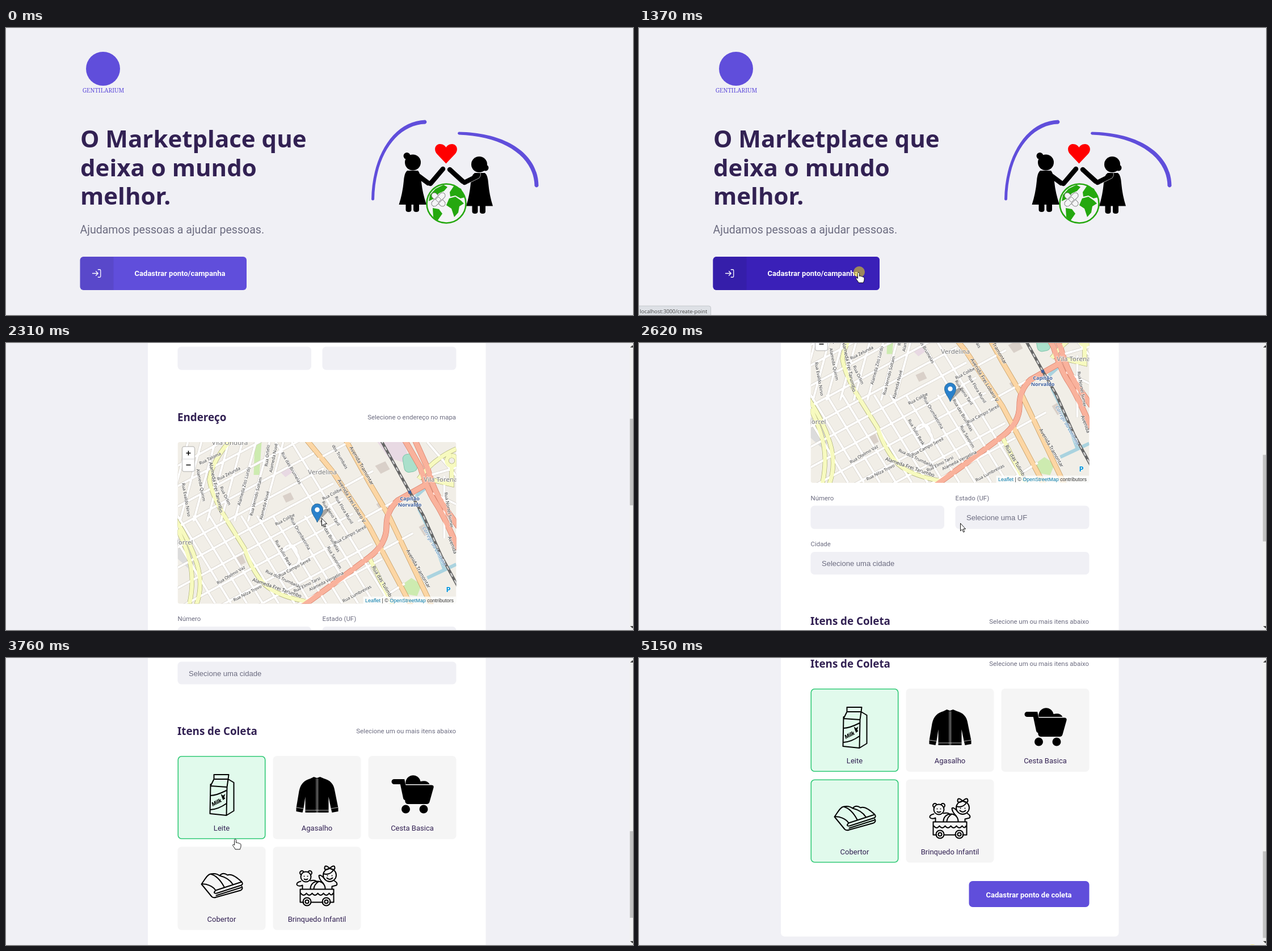
An HTML page for the animation above (5.23 s loop, 1105x507 px).

```html
<!DOCTYPE html>
<html lang="pt-BR">
<head>
<meta charset="utf-8">
<title>Ponto de coleta</title>
<style>
html, body { margin: 0; width: 100%; height: 100%; overflow: hidden; background: #f0f0f5; }
svg { display: block; width: 100%; height: 100%; font-family: Roboto, sans-serif; }
text { white-space: pre; }
.title { font: 700 42px "Noto Sans", "Open Sans", sans-serif; fill: #322153; }
.h1 { font-size: 28px; }
.h2 { font-size: 18.8px; }
.lead { font-size: 19.56px; fill: #6c6c80; }
.btn { font-size: 13.04px; font-weight: 700; fill: #fff; }
.label { font-size: 11.41px; fill: #6c6c80; }
.pick { font: 13.04px "Liberation Sans", Arial, sans-serif; fill: #6c6c80; }
.item { font-size: 13.04px; fill: #322153; text-anchor: middle; }
.end { text-anchor: end; }
.mid { text-anchor: middle; }
.line { fill: none; stroke: #000; stroke-width: 2; stroke-linejoin: round; stroke-linecap: round; }
#map text { font-family: "Noto Sans", sans-serif; font-size: 7.6px; fill: #333; text-anchor: middle;
  paint-order: stroke; stroke: #fff; stroke-width: 1.4px; stroke-opacity: .8; }
#map .big { font-size: 8.6px; }
#map .place { font-size: 11.5px; fill: #777; }
#map .stop { font-size: 9px; font-weight: 700; fill: #3d5f9e; }
#map .water { font-style: italic; fill: #4d80b3; font-size: 8.6px; }
#map .credit { font: 8.97px "Liberation Sans", Arial, sans-serif; text-anchor: end; stroke: none; }
</style>
</head>
<body>
<svg viewBox="0 0 1105 507">
  <rect width="1105" height="507" fill="#f0f0f5"/>
  <defs>
    <g id="logo">
      <circle cx="171" cy="72" r="30" fill="#604edb"/>
      <text x="171.5" y="114" class="mid" style="font:10.4px 'Noto Serif',serif;fill:#604edb">GENTILARIUM</text>
    </g>
  </defs>

  <g id="home">
    <use href="#logo"/>
    <g class="title">
      <text x="131" y="211">O Marketplace que</text>
      <text x="131" y="261.6">deixa o mundo</text>
      <text x="131" y="312.2">melhor.</text>
    </g>
    <text class="lead" x="130.5" y="362.5">Ajudamos pessoas a ajudar pessoas.</text>
    <rect x="130.5" y="404" width="293.5" height="59" rx="6" fill="#604edb"/>
    <rect id="hover" x="130.5" y="404" width="293.5" height="59" rx="6" fill="#3a20b8"/>
    <path d="M189.5 404H136.5a6 6 0 0 0-6 6v47a6 6 0 0 0 6 6h53z" fill-opacity=".08"/>
    <path transform="translate(151 424.5) scale(.75)" fill="none" stroke="#fff" stroke-width="1.7" stroke-linecap="round" stroke-linejoin="round"
      d="M15 3h4a2 2 0 0 1 2 2v14a2 2 0 0 1-2 2h-4M10 17l5-5-5-5M15 12H2"/>
    <text class="btn mid" x="306.5" y="438">Cadastrar ponto/campanha</text>

    <g fill="#604edb">
      <path d="M644 303C645 225 684 164 739 162.500q5 3.500 0 7C687 171 650 228 649 303q-2.500 3-5 0z"/>
      <path d="M798 183.500C882 185 938 222 938.500 279q-3.500 5-7 0C931 228 878 191 798 188.500q-4-2.500 0-5z"/>
    </g>
    <path fill="#f00" d="M775.5 239.5L759 222C753 214 757 205 765 205C770 205 774 208 775.5 211C777 208 781 205 786 205C794 205 798 214 792 222Z"/>
    <circle cx="717" cy="237.5" r="14"/><circle cx="706.5" cy="226" r="6"/>
    <path d="M707 252H726Q731 258 732 272Q734 292 741 312H692.5Q699 292 701 270Q702 256 707 252ZM704.5 311h10v10q0 4-5 4t-5-4zM718 311h10v10q0 4-5 4t-5-4z"/>
    <circle cx="834" cy="241" r="14"/><circle cx="845" cy="247" r="5.5"/>
    <path d="M826 256H844Q849 260 850 274Q852 296 858 314.500H811Q817 296 819 274Q820 260 826 256ZM821.5 314h10v10q0 4-5 4t-5-4zM835 314h10v10q0 4-5 4t-5-4z"/>
    <g class="line" style="stroke-width:8.5">
      <path d="M728 262L744 274M748 275L770 249"/>
      <path d="M828 263L808 273M805 271L782 250"/>
    </g>
    <path d="M812 276L834 265Q838 260 836 256" fill="none" stroke="#ccc" stroke-width=".8"/>
    <circle cx="776" cy="310" r="34.5" fill="#f4f4f6" stroke="#25a80f" stroke-width="2.6"/>
    <path fill="#25a80f" d="M757 284l14-7 7 4-6 7-9 4-10 10-8 4 2-11zM752 318l11 2 6 8-9 13-7-7zM782 290l8-12 12 6 7 15-8 2-9-5-9 2zM781 301l11-3 10 7 5 5-8 5-2 11-7 8-5-15-9-6z"/>
    <g fill="#f4f4f6" stroke="#666" stroke-dasharray="2 .7">
      <rect x="747" y="298" width="30" height="10" rx="5" transform="rotate(45 762 303)"/>
      <rect x="747" y="298" width="30" height="10" rx="5" transform="rotate(-45 762 303)"/>
      <path d="M757 303l5-5 5 5-5 5z"/>
    </g>
  </g>

  <g id="form">
    <g id="page"></g>
    <rect x="1099" width="6" height="507" fill="#f1f1f1"/>
    <rect id="thumb" x="1099.5" width="6" height="153" fill="#c1c1c1"/>
    <path d="M1100 8l4-4 4 4zM1100 500l4 4 4-4z" fill="#444"/>
  </g>

  <g id="status">
    <path d="M-1 491H123q3.5 0 3.5 3.5V508H-1z" fill="#dee1e6" stroke="#c4c7cc"/>
    <text x="1.5" y="503.5" style="font:9.3px 'Open Sans',sans-serif;fill:#444">localhost:3000/create-point</text>
  </g>
  <g id="pointer">
    <circle id="click" r="10" cx="1" cy="-1" fill="#fff000" fill-opacity=".5"/>
    <path id="arrow" fill="#fff" stroke="#000" stroke-width=".9" d="M.5.5V14L3.6 11.2L5.7 16.2L7.7 15.3L5.6 10.5H9.5Z"/>
    <path id="hand" fill="#fff" stroke="#000" stroke-width=".9" d="M-1.5 1.5C-1.5-.6 1.5-.6 1.5 1.5V6.5C3 5.7 4.5 6 4.6 7C6 6.5 7.3 7 7.4 8C8.8 7.6 10 8.4 10 9.6V12.5C10 15 8.5 16 8.5 18H0C-.5 15.5-4 13-4.5 10.5C-4.2 9-2.5 9.3-1.5 10.5Z"/>
  </g>
</svg>
<script>
const $ = id => document.getElementById(id);
const text = (x, y, s, cls) => `<text x="${x}" y="${y}" class="${cls}">${s}</text>`;
const box = (x, y, w, h, fill) => `<rect x="${x}" y="${y}" width="${w}" height="${h}" rx="6.5" fill="${fill}"/>`;
const line = (d, extra = '') => `<path class="line" d="${d}" ${extra}/>`;
const dot = (x, y, r, extra = '') => `<circle class="line" cx="${x}" cy="${y}" r="${r}" ${extra}/>`;

// --- street map, 491 x 285.5 ---
function streets() {
  let d = '';
  for (let x = -107; x < 220; x += 28) {
    const v = x < 160 ? 130 : 0;
    d += `M${x + v * .607} ${v}L${x + 173} 285`;
  }
  for (let x = -20; x < 150; x += 24) d += `M${x} 140L${x + 38} 0`;
  for (let c = 42; c < 430; c += 36) {
    const x = (228 + .64 * c) / 1.3475;
    d += `M0 ${c}L${x} ${c - .543 * x}`;
  }
  for (let v = 30; v < 220; v += 55) d += `M${228 + .64 * v} ${v}l62-34`;
  return d + 'M190 205a12 13 0 1 0 20-8a12 13 0 1 0-20 8M440 0L491 60M440 60L491 45M450 90L491 110M470 60V170M345 285L400 250';
}

const roads = [
  ['#fff', '#cfcac2', 4, streets()],
  ['#f7fabf', '#a3a56a', 7, 'M95-5Q62 30 56 66Q60 95 88 140L118 188Q130 225 150 248T228 282M-5 135Q22 175 34 215T32 290M0 155Q20 195 24 225T20 290M338 205L380 290M425 65Q450 30 491 12M483 24a9 9 0 1 0 .1 0M483 42V75L440 65'],
  ['#fcd6a4', '#b98d4f', 8, 'M228-3L273 52L338 150L412 290M296-4L338 72L372 130L448 290'],
  ['#f9b29c', '#d1705a', 9, 'M220 290L278 248L338 203Q368 180 368 150T388 103L436 76M400-4L428 45Q440 85 455 108T495 190M418-4L440 45Q452 90 474 120L495 150'],
];

const bigNames = [
  ['Alameda Frei Tarumbo', 67, 80, 78], ['Alameda Frei Tarumbo', 175, 258, 19],
  ['Avenida Tramontar', 324, 42, 60], ['Avenida Tramontar', 424, 224, 60],
  ['Avenida Frei Lobaro V', 306, 104, 59], ['Rua das Tulimbas', 362, 250, 60],
  ['Avenida', 484, 182, 70],
];
const names = [
  ['Rua Taloma', 57, 29, -26], ['Rua Zelunda', 90, 56, -27], ['Rua Colibe', 272, 92, -28],
  ['Rua Colibe', 189, 137, -28], ['Rua das Brumelas', 200, 46, 60], ['Rua das Brumelas', 268, 166, 60],
  ['Rua Nilza Trovo', 123, 267, -27], ['Rua Otelmo Vaz', 94, 235, -31], ['Rua Campo Sereil', 304, 164, -28],
  ['Rua Campo Sereil', 206, 222, -28], ['Alameda Vergelina', 262, 246, -27], ['Rua Elmo Tarsi', 228, 252, -27],
  ['Alameda Quirim', 41, 76, 79], ['Alameda Zito Lurdo', 117, 78, -75], ['Rua Vernido Soltam', 138, 96, -76],
  ['Rua Ortelo', 158, 24, -85], ['Alameda Nuvé', 169, 28, -79], ['Alameda Nuvé', 153, 112, -76],
  ['dos Trumbais', 286, 26, 60], ['Rua Beno Taril', 270, 126, 56], ['Rua Flora Munil', 293, 120, 59],
  ['Rua Orumbetinha', 216, 162, 60], ['Rua Tulio Besk', 186, 196, 60], ['Rua Savorim', 276, 204, 60],
  ['Rua dos Trumbelás', 186, 242, 25], ['Rua Evaldo Nirso', 15, 102, 80], ['Rua Orlim', 84, 95, 65],
  ['Rua Nortel Sumer', 478, 120, 80], ['Rua Lumbreiras', 316, 268, -28],
];
const label = (cls, dy = 2.5) => ([s, x, y, a]) =>
  `<text class="${cls}" transform="translate(${x} ${y}) rotate(${a})" y="${dy}">${s}</text>`;

function map() {
  const casing = roads.map(([, c, w, d]) => `<path d="${d}" stroke="${c}" stroke-width="${w + 1.2}"/>`);
  const fill = roads.map(([c, , w, d]) => `<path d="${d}" stroke="${c}" stroke-width="${w}"/>`);
  const rail = 'M358-4L409 88L433 130L465 202L494 255';
  return `<clipPath id="clip"><rect width="491" height="285.5" rx="4"/></clipPath>
  <g id="map" transform="translate(302.5 582)" clip-path="url(#clip)">
    <rect width="491" height="286" fill="#f1eee7"/>
    <path fill="#e8d9e3" d="M352 0h46l14 40-40-12zM180 52l14-10 10 10-14 10z"/>
    <path fill="#dcdcdc" d="M0 170l22 8 12 28-10 22-24-22z"/>
    <path fill="#cdebb0" d="M136 0h12l-4 58h-10zM398 250l14-10 18 12-8 20-22-4z"/>
    <path fill="#d9d0c9" d="M348 42l18-8 8 14-16 8zM185 95l14-6 6 12-14 6zM100 205l14-6 6 14-12 6zM350 110l10-8 6 10-10 6zM425 150l10-6 8 18-8 4z"/>
    <rect x="398" y="21" width="23" height="32" rx="8" fill="#aae0cb" stroke="#7fc5ab" transform="rotate(-10 409 37)"/>
    <path d="M425 118L448 165L470 225M440 240L491 216M420 96L440 78" fill="none" stroke="#aad3df" stroke-width="6"/>
    <g fill="none">${casing.join('')}${fill.join('')}
      <path d="${rail}" stroke="#666" stroke-width="5"/>
      <path d="${rail}" stroke="#ddd" stroke-width="2" stroke-dasharray="7 7"/></g>
    ${names.map(label('')).join('')}${bigNames.map(label('big')).join('')}
    ${label('water')(['Córrego da Lontrina', 452, 184, 61])}
    ${text(92, 5, 'Vila Ondura', 'place')}${text(255, 57, 'Verdelina', 'place')}
    ${text(467, 70, 'Vila Torenau', 'place')}${text(9, 181, 'Morrel', 'place')}
    ${text(409, 103, 'Capitão', 'stop')}${text(409, 114, 'Norvaldo', 'stop')}
    <rect x="406.5" y="86" width="5" height="5" fill="#3d5f9e"/>
    <text x="477" y="265" style="font-size:13px;font-weight:700;fill:#0092da">P</text>
    <path d="M246 142l15-15q7-6 3-9t-10 7z" fill-opacity=".3"/>
    <g transform="translate(246 142)"><path d="M0 0C-3-9-10-14-10-23a10 10 0 0 1 20 0C10-14 3-9 0 0Z" fill="#2a81cb" stroke="#2e6c97"/><circle cy="-22.5" r="4.2" fill="#fff"/></g>
    <rect x="8" y="8" width="22" height="44" rx="3.5" fill="#fff" stroke="#000" stroke-opacity=".2" stroke-width="1.6"/>
    <path d="M9 30H29" stroke="#ccc" stroke-width=".8"/>
    <path d="M15 19.5h8M19 15.5v8M15 40.5h8" stroke="#000" stroke-width="1.7"/>
    <rect x="327" y="273" width="164" height="13" fill="#fff" fill-opacity=".75"/>
    <text class="credit" x="486.5" y="282.5"><tspan fill="#0078a8">Leaflet</tspan> | © <tspan fill="#0078a8">OpenStreetMap</tspan> contributors</text>
  </g>`;
}

// --- collection items, 155 x 147 each ---
const items = [
  ['Leite', 0, 0, line('M58 50L57 102L86 105L87 55L58 53L64 41H89L87 55M64 41V33H90L89 41L99 47V97L86 105M58 70Q68 70 86 61M58 95Q72 94 86 84', 'stroke-width="2.6"') +
    '<text transform="translate(62 89) rotate(-27)" style="font-size:9.5px;font-weight:900;font-style:italic">Milk</text><path d="M76 67l4 3 4-3-2 6 2 2-4 3-2-5z"/>'],
  ['Agasalho', 1, 0, '<path d="M66 40L72 37L77.5 39L83 37L90 40C100 43 107 48 109 62L115 92V98L104 100L102 92L98 72V100H57V72L54 92L52 100L41 98V92L46 62C49 48 56 43 66 40Z"/><path d="M76.5 40V100M79 40V100M41 91l13 2M115 91l-13 2M57 96h41" stroke="#ddd" stroke-width=".8" fill="none"/>'],
  ['Cesta Basica', 2, 0, '<path d="M45.5 45.5H60L66 74" fill="none" stroke="#000" stroke-width="9" stroke-linecap="round"/><path d="M66 50A13 13 0 0 1 92 45Q104 42 108 50ZM62 51.5H111Q116 51.5 115 56L108 81Q107 85 103 85H70Q66 85 65 81Z"/><circle cx="66" cy="94" r="7.5"/><circle cx="97.5" cy="94" r="7.5"/>'],
  ['Cobertor', 0, 1, line('M42 66C48 58 52 49 58 48Q68 46 74 51Q80 44 88 50Q96 46 113 62L67 77C62 69 50 65 42 66ZM42 66L60 88Q63 91 68 89L111 77Q116 74 113 70M113 62Q116 66 112 68L69 82Q61 83 67 77M68 86L112 72M58 48Q72 52 82 71M74 51Q90 55 97 66', 'stroke-width="2.3"')],
  ['Brinquedo Infantil', 1, 1, line('M48 75H107V98H100M88 98H67M54 98H48V75M49 82q5 7 10 0q5 7 10 0q5 7 10 0q5 7 10 0q5 7 10 0q4 6 7 0') +
    dot(60, 97, 7) + dot(60, 97, 3) + dot(94, 97, 7) + dot(94, 97, 3) + line('M66 74A12 12 0 0 1 92 74M72 74Q73 66 80 62M49 61q-8 2-7 6q3 4 10 1v6M66 60q9-2 11 2M92 58q-8-10-11-7q0 6 8 14M108 60q7 4 4 8l-8 2v4') +
    dot(51, 46, 3.5) + dot(65, 46, 3.5) + dot(58, 53, 9, 'style="fill:#f5f5f5"') + dot(100, 50, 11.5) +
    line('M55 52v.1M61 52v.1M55 57q3 2 6 0M90 48Q100 50 106 42M96 51v.1M104 51v.1M95 55q5 5 10 0M100 38q-9-8-9 0q1 5 9 0q9-8 9 0q-1 5-9 0')],
];
const card = ([name, col, row, art], i) =>
  `<g transform="translate(${302.5 + 168 * col} ${1156 + 160.5 * row})">${box(0, 0, 155, 147, '#f5f5f5')}
    <rect id="on${i}" x=".8" y=".8" width="153.4" height="145.4" rx="6" fill="#e1faec" stroke="#34cb79" stroke-width="1.63"/>
    ${art}${text(77.5, 132, name, 'item')}</g>`;

const heading = (y, s, note = '') => text(302, y + 6.8, s, 'title h2') + text(793, y + 4, note, 'label end');
const field = (x, y, w, s, pick = '', h = 41) =>
  text(x, y - 10, s, 'label') + box(x, y, w, h, '#f0f0f5') + text(x + 19.5, y + 25, pick, 'pick');

$('page').innerHTML = '<use href="#logo" x="-27" y="-12"/>' +
  '<path d="M881 50h11M881 50l4-4M881 50l4 4" stroke="#604edb" stroke-width="1.5"/>' +
  '<text x="1000" y="54.5" class="btn end" style="fill:#322153">Voltar para home</text>' +
  box(250, 118, 595.5, 1476, '#fff') + text(302, 196, 'Cadastro do ponto de coleta', 'title h1') +
  heading(266, 'Dados') + field(302.5, 332, 491, 'Nome da entidade') +
  field(302.5, 413.5, 235.5, 'E-mail') + field(557.5, 413.5, 236, 'FalaJato') +
  heading(538, 'Endereço', 'Selecione o endereço no mapa') + map() +
  field(302.5, 908, 235.5, 'Número') + field(557.5, 908, 236, 'Estado (UF)', 'Selecione uma UF') +
  field(302.5, 989.5, 491, 'Cidade', 'Selecione uma cidade', 40) +
  heading(1112, 'Itens de Coleta', 'Selecione um ou mais itens abaixo') + items.map(card).join('') +
  box(581.5, 1496, 212, 46, '#604edb') + text(687, 1524.5, 'Cadastrar ponto de coleta', 'btn mid');

// --- timeline ---
const LOOP = 5230;
const runs = [[210, 680, 7], [760, 1140, 6], [1310, 1600, 5], [1760, 2230, 7], [2310, 2310, 1], [2470, 2930, 7],
  [3010, 3450, 7], [3540, 3990, 7], [4070, 4450, 6], [4600, 5020, 6], [5150, 5150, 1]];
const ticks = [0, ...runs.flatMap(([a, b, n]) => Array.from({ length: n }, (_, i) =>
  n < 2 ? a : Math.floor((a + (b - a) * i / (n - 1)) / 10) * 10))];

const cursor = [[210, 1066, 481], [400, 850, 425], [560, 690, 394], [680, 605, 397], [840, 470, 415], [1000, 405, 430],
  [1140, 387, 432], [1450, 387, 432], [1600, 460, 385], [1760, 520, 340], [2070, 563, 322], [2230, 562, 310],
  [2310, 556, 309], [2620, 566, 318], [2850, 700, 330], [3150, 893, 345], [3300, 700, 285], [3450, 468, 262],
  [3560, 404, 255], [3700, 404, 260], [3840, 404, 400], [3990, 404, 402], [4140, 760, 335], [4290, 973, 304],
  [4530, 973, 304], [4800, 1012, 400], [5020, 1062, 507], [5150, 1080, 517]];
const scroll = [[1700, 0], [1840, 50], [2070, 228], [2230, 407], [2400, 407], [2620, 620.5], [2760, 780], [2860, 815],
  [3050, 815], [3150, 875], [3300, 960], [3400, 983], [4220, 983], [4290, 1014.5], [4450, 1102]];
const hover = [[930, 0], [1140, 1]];
const clicks = [[1310, 1450], [3600, 3720], [3840, 3960], [5150, LOOP]];

function at(keys, t) {
  const i = keys.findIndex(k => k[0] > t);
  if (i === 0) return keys[0].slice(1);
  if (i < 0) return keys[keys.length - 1].slice(1);
  const a = keys[i - 1], b = keys[i], p = (t - a[0]) / (b[0] - a[0]);
  return a.slice(1).map((v, j) => v + (b[j + 1] - v) * p);
}
const show = (id, on) => $(id).style.display = on ? '' : 'none';

function draw(t) {
  const [x, y] = at(cursor, t), [top] = at(scroll, t);
  const home = t < 1450;
  const hand = home ? x < 424 && y > 404 : t > 3450 && t < 4070 && x < 457;
  show('home', home);
  show('form', !home);
  show('status', t >= 1310 && t < 1830);
  $('hover').setAttribute('opacity', at(hover, t)[0]);
  $('page').setAttribute('transform', `translate(0 ${-top})`);
  $('thumb').setAttribute('y', 12 + top * .299);
  items.forEach((_, i) => show('on' + i, i === 0 && t >= 3600 || i === 3 && t >= 3840));
  show('pointer', t >= 210);
  $('pointer').setAttribute('transform', `translate(${x} ${y})`);
  show('hand', hand);
  show('arrow', !hand);
  show('click', clicks.some(([a, b]) => t >= a && t < b));
}

function frame() {
  const t = performance.now() % LOOP;
  draw(ticks.filter(k => k <= t).pop());
  requestAnimationFrame(frame);
}
frame();
</script>
</body>
</html>
```
